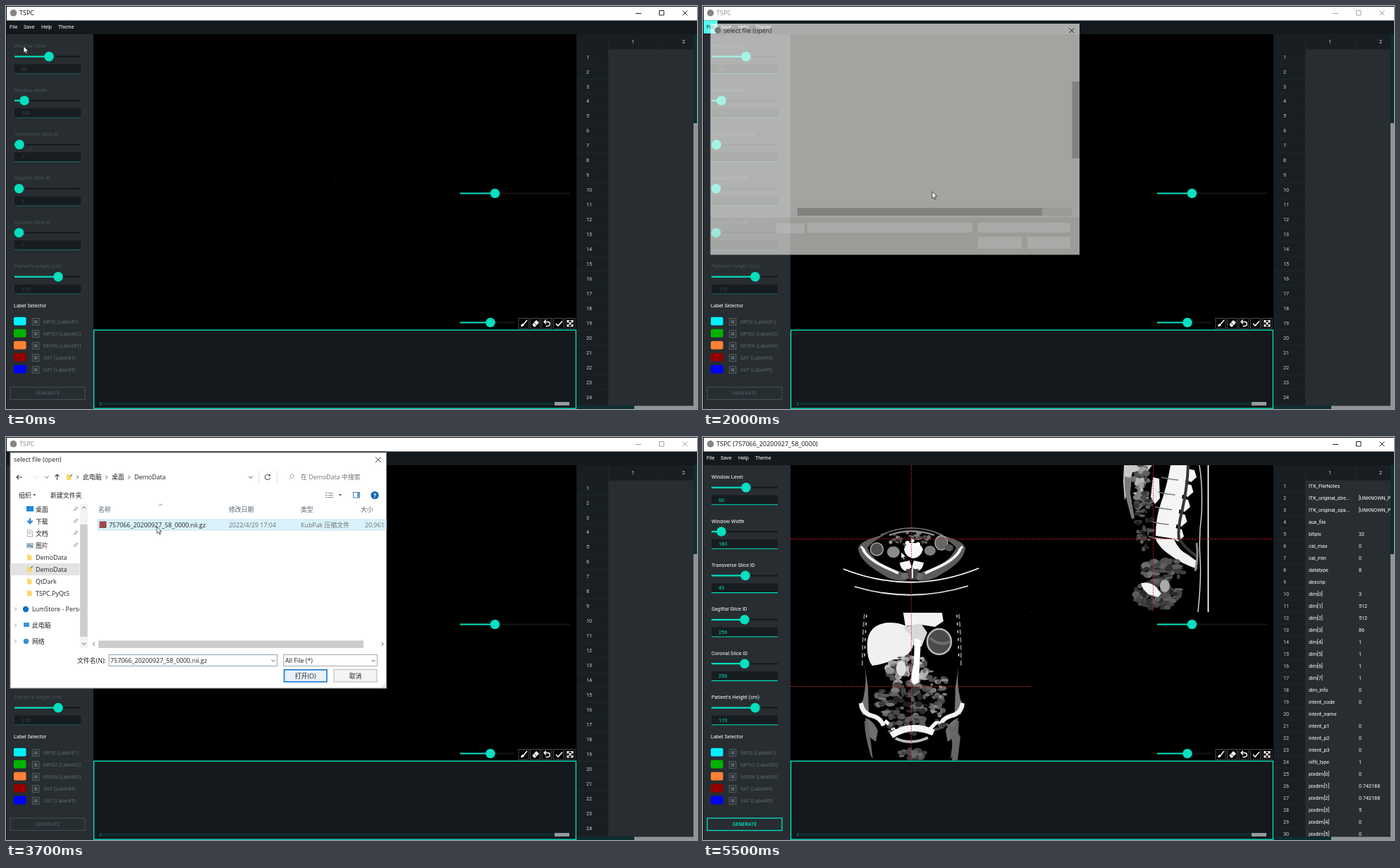
Animation, 980 px wide and 571 px high, one loop 5600 ms. Source, as an HTML page:

```html
<!DOCTYPE html>
<html lang="en">
<head>
<meta charset="utf-8">
<title>TSPC</title>
<style>
html, body { margin: 0; width: 100%; height: 100%; overflow: hidden; background: #000; }
svg { display: block; width: 980px; height: 571px; }
text { font: 7.3px Roboto, sans-serif; white-space: pre; }
.win, .win text { font: 9px "Open Sans", "Noto Sans", sans-serif; }
.dlg text { font: 8.9px "Open Sans", "Noto Sans", "Noto Sans CJK SC", "Noto Sans CJK", sans-serif; }
.table text { font-size: 7.2px; }
</style>
</head>
<body>
<svg id="stage" viewBox="0 0 980 571" xmlns="http://www.w3.org/2000/svg"></svg>
<script>
const LOOP = 5600;
const TEAL = '#05dfc0', DARK = '#13191c', PANEL = '#272d31';
let css = '', count = 0;

// ---- drawing helpers
const rect = (x, y, w, h, fill, more = '') => `<rect x="${x}" y="${y}" width="${w}" height="${h}" fill="${fill}" ${more}/>`;
const frame = (x, y, w, h, stroke, fill = 'none', sw = 1) => rect(x, y, w, h, fill, `stroke="${stroke}" stroke-width="${sw}"`);
const text = (x, y, s, fill = '#fff', more = '') => `<text x="${x}" y="${y}" fill="${fill}" ${more}>${s}</text>`;
const line = (d, stroke, sw = 1, more = '') => `<path d="${d}" fill="none" stroke="${stroke}" stroke-width="${sw}" ${more}/>`;
const shape = (d, fill) => `<path d="${d}" fill="${fill}"/>`;
const dot = (x, y, r, fill) => `<circle cx="${x}" cy="${y}" r="${r}" fill="${fill}"/>`;
const oval = (x, y, rx, ry, fill, more = '') => `<ellipse cx="${x}" cy="${y}" rx="${rx}" ry="${ry}" fill="${fill}" ${more}/>`;
const group = (cls, ...parts) => `<g class="${cls}">${parts.flat().join('')}</g>`;

// ---- timing helpers
const pct = t => (Math.max(0, t - 4) / LOOP * 100).toFixed(3) + '%';

// shown between each pair of times
function show(cls, ...spans) {
  const on = 'visibility:visible', off = 'visibility:hidden';
  let keys = `0%{${off}}`, last = off;
  spans.forEach(([from, to = LOOP]) => {
    keys += `${pct(from)}{${on}}`;
    last = on;
    if (to < LOOP) { keys += `${pct(to)}{${off}}`; last = off; }
  });
  css += `@keyframes k${++count}{${keys}100%{${last}}} .${cls}{animation:k${count} ${LOOP}ms step-end infinite}\n`;
}

// moves through [time, x, y] stops in steps of 100 ms
function travel(cls, stops) {
  const keys = stops.map(([t, x, y], i) => {
    const n = i + 1 < stops.length ? (stops[i + 1][0] - t) / 100 : 1;
    return `${pct(t)}{transform:translate(${x}px,${y}px);animation-timing-function:steps(${n})}`;
  }).join('');
  const [, x, y] = stops[stops.length - 1];
  css += `@keyframes k${++count}{${keys}100%{transform:translate(${x}px,${y}px)}} .${cls}{animation:k${count} ${LOOP}ms infinite}\n`;
}

// ---- main window
const controls = c => line('M893 10.5h8M926.5 6.5h6.5v6.5h-6.5zM959.5 6.5l7 7M966.5 6.5l-7 7', c);

function titleBar() {
  return group('win', rect(1, 1, 979, 19.5, '#fff'), dot(10.5, 9.8, 4.8, '#858585'),
    group('plain', text(19, 13.2, 'TSPC', '#111')),
    group('faded', text(19, 13.2, 'TSPC', '#8c8c8c')),
    group('named', text(19, 13.2, 'TSPC (757066_20200927_58_0000)', '#111')),
    group('active', controls('#222')), group('faded', controls('#a2a2a2')));
}

const slider = (x0, x1, y, knob, rest = '#12181b') =>
  line(`M${x0} ${y}H${x1}`, rest, 2) + line(`M${x0} ${y}H${knob}`, TEAL, 2.2) + dot(knob, y, 6.8, TEAL);

const fields = [
  ['Window Level', 60, 61], ['Window Width', 180, 26],
  ['Transverse Slice ID', 1, 19, 43, 60], ['Sagittal Slice ID', 1, 18.5, 256, 59],
  ['Coronal Slice ID', 1, 18.5, 256, 59], ["Patient's Height (cm)", 170, 74],
];

function fieldSet(loaded) {
  return fields.map(([name, v0, k0, v1 = v0, k1 = k0], i) => {
    const y = 56.5 + i * 62.4;
    return text(12, y + 2.6, name, loaded ? '#fff' : '#4b5358') +
      slider(12, 106, y + 15.1, loaded ? k1 : k0) +
      rect(12, y + 26, 94, 13.5, '#161c1f') +
      line(`M12 ${y + 39.3}h94`, loaded ? TEAL : '#1d5f5b', 1.1) +
      text(22, y + 35.1, loaded ? v1 : v0, loaded ? TEAL : '#3a4347');
  }).join('') +
    frame(6, 540, 106, 17.5, loaded ? TEAL : '#465055', 'none', loaded ? 1.3 : 1) +
    text(59, 551.4, 'GENERATE', loaded ? TEAL : '#4b555a', 'text-anchor="middle" style="font-weight:500;font-size:7px"');
}

function labels() {
  const rows = [['MPSI', '#00f2ff'], ['MPSO', '#00b200'], ['MVEN', '#ff8136'], ['SAT', '#950000'], ['VAT', '#0000fe']];
  return text(11, 427, 'Label Selector') + rows.map(([s, c], i) => {
    const y = 447.5 + i * 17;
    return rect(11, y - 6.7, 17.5, 11.6, c, 'rx="2"') + frame(37.3, y - 4.8, 9.6, 9.6, '#5a6367') +
      rect(39.6, y - 2.5, 5, 5, '#565f63') + text(53, y + 2.8, `${s} (Label#${i + 1})`, '#5f686c');
  }).join('');
}

function tools() {
  const icons = [
    line('M739 445l-5 6', '#fff', 1.6) + shape('M730 454q1-4 3-4l2 2q-1 2-5 2z', '#fff'),
    shape('M746.5 451l5.5-6 4 3.5-5.5 6h-2z', '#fff') + line('M748.5 448.7l4 3.7', '#000', .8),
    line('M763 447.5h5.5q3 .3 3 3t-3 3h-3M766 444.5l-3 3 3 3', '#fff', 1.3),
    line('M780 450l3 3 6-6.5', '#fff', 1.6),
    line('M796 449v-3.5h3.5M800.5 445.5h3.5v3.5M804 450.5v3.500h-3.5M799.500 454h-3.5v-3.5M796 445.500l8 8.500M804 445.500l-8 8.500', '#fff', 1.1),
  ];
  return icons.map((icon, i) => frame(727 + i * 16.5, 442.5, 14, 14.5, '#4d4d4d', '#000') + icon).join('');
}

function view() {
  return rect(124, 40, 685, 419, '#000') + rect(465.5, 248, 1.2, 1.2, '#333');
}

function viewTools() {
  return slider(644, 800, 265.5, 693.5, '#151515') + slider(644, 722, 448.5, 687, '#151515') + tools();
}

function log() {
  return frame(124.6, 459.2, 683.8, 111, TEAL, DARK, 1.4) +
    line('M134 563.5h665', '#0d2e2f', 3.5) + rect(133.5, 561, 1, 5, '#16857a') + rect(778, 561, 21, 5, '#959b9d');
}

// ---- header table
function tableData() {
  const seq = (name, from, values) => values.map((v, i) => [`${name}${from + i}`, v]);
  const close = rows => rows.map(([k, v]) => [k + ']', v]);
  return [['ITK_FileNotes', ''], ['ITK_original_dire...', '[UNKNOWN_PRINT'], ['ITK_original_spa...', '[UNKNOWN_PRINT'],
    ['aux_file', ''], ['bitpix', 32], ['cal_max', 0], ['cal_min', 0], ['datatype', 8], ['descrip', ''],
    ...close(seq('dim[', 0, [3, 512, 512, 86, 1, 1, 1, 1])), ['dim_info', 0], ['intent_code', 0], ['intent_name', ''],
    ...seq('intent_p', 1, [0, 0, 0]), ['nifti_type', 1], ...close(seq('pixdim[', 0, [0, '0.742188', '0.742188', 5, 0, 0]))];
}

function rowHeads(n, first, step) {
  let s = '';
  for (let i = 0; i < n; i++) {
    const y = first + i * step;
    s += text(823, y + 2.6, i + 1, '#cdd1d3') + line(`M810 ${y + step / 2}H854`, '#22292c', .8);
  }
  return s;
}

function table() {
  const cells = tableData().map(([k, v], i) =>
    text(859, 72.1 + i * 17, k) + text(930, 72.1 + i * 17, v)).join('');
  return group('table', rect(809, 40, 171, 531, '#181e21'), rect(854, 61.5, 121, 505, PANEL),
    line('M854.500 40v526M925.500 40v22', '#22292c', .8),
    text(889, 53.3, 1, '#dde0e1', 'text-anchor="middle"'), text(961, 53.3, 2, '#dde0e1', 'text-anchor="middle"'),
    group('empty', rowHeads(24, 72, 20.96)),
    group('loaded', rowHeads(30, 69.5, 17), `<g clip-path="url(#cells)">${cells}</g>`),
    rect(975, 40, 5, 126, '#0b2f30'), rect(975, 166, 5, 405, '#8f9597'),
    rect(809, 566.5, 82, 4.5, '#0b2f30'), rect(891, 566.5, 84, 4.5, '#8f9597'));
}

// ---- scan slices
let seed = 11;
const rnd = () => (seed = seed * 16807 % 2147483647) / 2147483647;

function tissue(cx, cy, rx, ry, n, size, lo, hi) {
  let s = '';
  for (let i = 0; i < n; i++) {
    const a = rnd() * 6.283, r = Math.sqrt(rnd()), g = Math.round(lo + (hi - lo) * rnd());
    s += oval((cx + rx * r * Math.cos(a)).toFixed(1), (cy + ry * r * Math.sin(a)).toFixed(1),
      (size * (.4 + rnd())).toFixed(1), (size * (.3 + .7 * rnd())).toFixed(1), `rgb(${g},${g},${g})`);
  }
  return s;
}

const mirror = (cx, s) => s + `<g transform="translate(${2 * cx} 0) scale(-1 1)">${s}</g>`;

function axial() {
  const side = shape('M220 158Q221 150 238 144L262 136Q240 148 233 157Q240 174 262 184L288 194V203Q270 206 252 193Q222 176 220 158Z', '#5c5c5c') +
    line('M227 159Q234 174 262 186L277 193', '#f4f4f4', 4) + line('M224 155l5 6', '#fff', 3) +
    shape('M279 178l14-3 3 10-9 5q-7-3-8-12z', '#f6f6f6') + oval(287, 197, 6, 5, '#6d6d6d');
  return mirror(296, side) +
    line('M252 139Q295 119 340 139', '#777', 1.6) + line('M264 139Q296 128 328 139', '#8d8d8d', 2.5) +
    oval(246.500, 159, 9, 9, '#4e4e4e', 'stroke="#a5a5a5" stroke-width="1.5"') +
    oval(270, 163, 9, 8, '#8b8b8b') + oval(322, 161, 8, 7, '#7d7d7d') +
    oval(338, 150, 9, 10, '#666', 'stroke="#a5a5a5" stroke-width="1.500"') + oval(349, 157, 6, 5, '#555') +
    tissue(296, 145, 34, 10, 34, 3, 60, 150) +
    shape('M285 159q3-10 12-9 11-1 15 9-3 12-14 13-11-2-13-13z', '#f8f8f8') +
    dot(290, 150, 3, '#fff') + dot(297, 147, 2.6, '#eee') + dot(305, 152, 3, '#fff') +
    shape('M288 187h18l-4 15h-10z', '#444') + line('M297 186v14', '#fff', 2) +
    line('M199 187Q295 225 391 186', '#fff', 1.8) + line('M215 212Q295 236 376 211', '#eee', 1.8);
}

function coronal() {
  const side = line('M229 251Q226 280 226 325', '#777', 2, 'stroke-dasharray="7 4"') +
    line('M232 252Q230 280 229 318', '#ddd', 1.4, 'stroke-dasharray="4 7"') +
    shape('M229 322q4 25-2 50l-6 10 6 12 8-4-1-36z', '#747474') +
    line('M224 377Q226 392 240 395Q252 398 256 409', '#f2f2f2', 6) +
    shape('M230 398q12 4 18 18l-3 16-10-8z', '#6f6f6f') +
    line('M258 402q12 10 16 18', '#fff', 5) + shape('M229 402q0 20 9 50l3 4q-4-30-6-50z', '#666');
  return mirror(296, side) +
    shape('M284 249h55l2 12-12 8-20-3-22 2z', '#f3f3f3') +
    shape('M233 292Q234 266 262 263Q290 262 301 280L297 299Q287 317 271 315Q257 322 240 324Q232 315 233 292Z', '#f0f0f0') +
    shape('M283 270l26-6 9 13-8 20-11-1-5-16z', '#d9d9d9') +
    oval(335, 290, 17, 18, '#4a4a4a', 'stroke="#b9b9b9" stroke-width="2.5"') +
    line('M322 285q14 12 28 5', '#6d6d6d', 4) +
    tissue(292, 330, 34, 20, 55, 5, 70, 190) + tissue(290, 375, 48, 28, 100, 5, 25, 125) +
    tissue(333, 365, 15, 30, 40, 4, 70, 155) +
    shape('M300 285l9 3-3 60-7 3-5-6 5-25z', '#fff') + oval(281, 328, 7, 11, '#ddd') +
    tissue(296, 408, 45, 12, 40, 4, 50, 110) +
    line('M267 423Q296 404 327 419', '#f5f5f5', 9) + line('M273 427q22 10 46-1', '#bbb', 4) +
    tissue(296, 450, 20, 7, 28, 5, 55, 110) +
    shape('M344 405q16 5 21 21l-4 32h-8q4-30-9-53z', '#666');
}

function sagittal() {
  let bones = '';
  for (let i = 0; i < 5; i++) {
    const x = 661 - i * 4.5, y = 57 + i * 21;
    bones += line(`M${x - 11} ${y}q11 3 24 4`, '#777', 1.7) +
      shape(`M${x + 22} ${y - 13}l14 3 3 10-8 7-12-6z`, '#f7f7f7');
  }
  return shape('M597 40h40l-6 8-22 2-5 22-6 18-2-26z', '#c9c9c9') +
    shape('M598 56q-1 20 4 38l6 22 4-1-6-35 2-22z', '#7a7a7a') +
    tissue(622, 65, 12, 25, 32, 5, 65, 195) + tissue(625, 118, 12, 42, 55, 4, 25, 110) +
    shape('M638 57l9 2 1 28-7 8-6-10z', '#eee') +
    shape('M663 40h25q-3 25-11 55-5 30-10 49l-25-4q0-25 7-45 9-25 14-55z', '#f5f5f5') + bones +
    shape('M641 143l27 2q7 16 20 22l11 8 2 12q-23-8-36-18-18-11-24-26z', '#f2f2f2') +
    line('M688 40q-1 30-8 62-7 27-5 42 10 15 25 25', '#373737', 4) +
    line('M704 40q5 30 3 70-4 30-2 62 2 28-3 76', '#ddd', 1.4) +
    line('M700 150q3 20-2 40', '#888', 3) +
    tissue(653, 190, 30, 18, 80, 5, 40, 115) + tissue(645, 224, 33, 20, 100, 5, 40, 100) +
    shape('M621 207q13-2 21 5l8 10-5 5-13-4q-9-7-11-16z', '#f4f4f4') + oval(655, 211, 7, 9, '#aaa') +
    line('M716.500 40v208', '#fff', 1.8);
}

function scans() {
  return axial() + `<g clip-path="url(#lower)">${coronal()}</g><g clip-path="url(#upper)">${sagittal()}</g>` +
    line('M124 144.500H808M124 353.500H466M295.500 40V458M638.500 40V248', '#e3242b', 1, 'stroke-dasharray="1.600 1.600"');
}

// ---- file menu
const menuWords = () => text(25, 32.1, 'Save') + text(50, 32.1, 'Help') + text(74, 32.1, 'Theme');

function dropDown() {
  return group('menu', frame(1, 39.500, 90.500, 50, '#9aa1a3', DARK),
    group('hover', rect(1.500, 40, 89.500, 24.500, '#62fff5')),
    group('calm', text(10, 54.600, 'Open `.nii.gz` file ...')),
    group('hover', text(10, 54.600, 'Open `.nii.gz` file ...', '#10211f')),
    text(10, 79.600, 'Open `.dicom` file ...'));
}

// ---- file dialog
const INK = '#222', SOFT = '#6f7275';
const folder = (x, y) => shape(`M${x} ${y - 4}h3l1 1h2.500v7h-6.500z`, '#fbd769');
const sheet = (x, y) => line(`M${x} ${y - 4.500}h5l2 2v7h-7z`, '#9a9a9a', .8);
const chevron = (x, y, dx, dy, c = '#555') =>
  line(dx ? `M${x - dx} ${y - 2.500}l${2 * dx} 2.500l${-2 * dx} 2.500` : `M${x - 2.500} ${y - dy}l2.500 ${2 * dy}l2.500 ${-2 * dy}`, c);
const down = (x, y) => shape(`M${x - 2} ${y - 1}h4l-2 2.500z`, '#444');

function sideBar() {
  const top = ['桌面', '下载', '文档', '图片', 'DemoData', 'DemoData', 'QtDark', 'TSPC.PyQt5'];
  const pins = [0, 1, 2, 3].map(i => line(`M96 ${105 + i * 17}l2-2m-1-2l3 3m-1.500-2l2.500-2.500m-2-1l3 3`, '#8b8b8b', 1)).join('');
  return group('home', rect(6, 258, 98.500, 17.500, '#e9e9e9')) + group('demo', rect(6, 179, 98.500, 17, '#e3e3e3')) +
    rect(29, 98, 10, 7.500, '#1d87e0') + line('M34 115v7m-3.500-3.500l3.500 4 3.500-4', '#2a86d8', 2) +
    sheet(30.500, 136.500) + line('M32 135h4m-4 2h4', '#8aa0b5', .8) +
    rect(29, 150, 10, 7.500, '#a8c5d8') + line('M30 155l3-2 5 3', '#3d5c70') +
    [170.500, 187.500, 204.500, 221.500].map(y => folder(30, y)).join('') + line('M35 186l3-3', '#3c8f6c', 1.300) +
    top.map((s, i) => text(42, 105.500 + i * 17, s, INK)).join('') + pins +
    dot(28, 244, 4.200, '#1570c8') + `<g clip-path="url(#side)">${text(37, 247.200, 'LumStore - Personal', INK)}</g>` +
    text(37, 270.200, '此电脑', INK) + text(37, 292.700, '网络', INK) +
    group('demo', [244, 267, 289.500].map(y => chevron(13.500, y, 1.200, 0, '#999')).join(''),
      rect(25, 263, 8, 6, '#3a96d8'), dot(28.500, 289.500, 3.800, '#3b8fc9')) +
    rect(105, 95, 11, 204, '#f3f3f3') + rect(105, 124, 10.500, 159, '#cdcdcd') +
    chevron(110.500, 100, 0, -1.300) + chevron(110.500, 293, 0, 1.300);
}

function chrome() {
  return frame(6, 22, 533.500, 334, '#8a8a8a', '#fff') +
    group('early', dot(16.500, 32, 4.600, '#858585'), text(25, 35.300, 'select file (open)', INK)) +
    group('late', text(11, 35.300, 'select file (open)', INK)) +
    line('M524 28.500l7.500 7.500M531.500 28.500l-7.500 7.500', '#333') +
    line('M72.500 61v-8m-3 3l3-3 3 3', '#444', 1.100) + folder(86, 57) + chevron(347, 57, 0, 1.500) +
    line('M358.500 47v20M384.500 47v20', '#e3e3e3') +
    line('M374 54.500a3.700 3.700 0 1 0 .7 3M374.500 52.500v2.500h-2.500', '#555', 1.100) +
    line('M402 60l2-2.500a2.600 2.600 0 1 1 1 .6', '#9a9a9a') +
    text(18, 85.500, '组织', INK) + down(40.500, 82) + text(63, 85.500, '新建文件夹', INK) +
    line('M453 79.500h3m1 0h7m-11 3h3m1 0h7m-11 3h3m1 0h7', '#8a8a8a') + down(474, 82) +
    frame(492.500, 78.500, 9, 7.500, '#4a7fae', '#fff') + rect(498, 79, 3.500, 6.500, '#58a6e2') +
    dot(523, 82.500, 5.600, '#1266b5') + text(523, 85.700, '?', '#fff', 'text-anchor="middle" style="font-weight:700"') +
    chevron(219, 96, 0, -1.200, '#888') +
    [[131, '名称'], [316, '修改日期'], [418, '类型'], [503, '大小']].map(([x, s]) => text(x, 106, s, '#5a6673')).join('') +
    text(101, 319.700, '文件名(N):', INK) +
    frame(393.500, 308.500, 133, 16, '#a9a9a9', '#fff') + text(396, 319.700, 'All File (*)', INK) + chevron(521, 317, 0, 1.300) +
    frame(394.500, 329.800, 60.500, 17, '#1479d2', '#e9f1f8', 1.600) + frame(465, 329.500, 61, 17.500, '#b5b5b5', '#f4f4f4') +
    text(424.700, 341.500, '打开(O)', INK, 'text-anchor="middle"') + text(495.500, 341.500, '取消', INK, 'text-anchor="middle"') +
    line('M533 355l5-5m-2.500 5l2.500-2.500', '#bbb');
}

const hBar = (w, arrow) => chevron(124.500, 293.500, -1.300, 0) + rect(131, 288.500, w, 10.500, '#cdcdcd') + chevron(arrow, 293.500, 1.300, 0);

function projectPage() {
  const rows = [['.git', '7/24 0:10'], ['.virtual_documents', '7/24 0:21'], ['__pycache__', '7/24 22:29'], ['build', '7/24 18:53'],
    ['Caches', '7/24 22:41'], ['DATASET', '7/23 12:39'], ['dist', '7/24 19:11'], ['Icons', '7/24 20:36'],
    ['757066_20200927_58_0000.nii.gz', '7/24 22:40', 'KubPak 压缩文件'], ['main.py', '7/24 22:38', 'PY 文件'], ['main.spec', '7/24 18:53', 'SPEC 文件']];
  return line('M22 57h-7m3-3l-3 3 3 3M39 57h7m-3-3l3 3-3 3', '#ececec') +
    text(98, 59.800, '«', INK) + text(109, 59.800, 'paper', INK) + chevron(140.500, 57, 1.200, 0) +
    text(148, 59.800, 'W-Journal 2022-CART', INK) + chevron(246.500, 57, 1.200, 0) + text(254, 59.800, 'TSPC.PyQt5', INK) +
    text(418, 59.800, '在 TSPC.PyQt5 中搜索', SOFT) + rect(130, 254.500, 398, 15, '#f5f9fb') +
    rows.map(([name, date, type], i) => {
      const y = 124.700 + i * 15.270;
      return (type ? sheet : folder)(134, y) + text(146, y + 3.200, name, INK) +
        text(316, y + 3.200, '2022/' + date, SOFT) + text(418, y + 3.200, type || '文件夹', SOFT);
    }).join('') + line('M134 287.500h5l2 1', '#9a9a9a', .8) +
    rect(528.500, 95, 10.500, 192, '#f3f3f3') + rect(528.500, 106, 10.500, 111, '#cdcdcd') +
    chevron(534, 100, 0, -1.300) + chevron(534, 282, 0, 1.300) + hBar(354.500, 521.500) +
    frame(146, 308.500, 238.500, 16, '#2f86d6', '#fff') + line('M148.500 311.500v10', '#111', .9) + chevron(379, 317, 0, 1.300);
}

function demoPage() {
  const file = '757066_20200927_58_0000.nii.gz';
  return line('M23 57h-8m3-3l-3 3 3 3', '#444', 1.100) + line('M39 57h7m-3-3l3 3-3 3', '#e8e8e8') + chevron(58, 57, 0, 1.200) +
    line('M91 56l3-3', '#3c8f6c', 1.300) + chevron(101.500, 57, 1.200, 0) + text(109, 59.800, '此电脑', INK) + chevron(142.500, 57, 1.200, 0) +
    text(150, 59.800, '桌面', INK) + chevron(174.500, 57, 1.200, 0) + text(182, 59.800, 'DemoData', INK) +
    text(418, 59.800, '在 DemoData 中搜索', SOFT) +
    group('picked', frame(130.500, 117, 408.500, 15, '#c0e4f3', '#dbf2fb')) +
    rect(132.500, 119.500, 10, 9.500, '#9b4a50') + text(146, 127.900, file, INK) +
    text(316, 127.900, '2022/4/29 17:04', SOFT) + text(418, 127.900, 'KubPak 压缩文件', SOFT) + text(509, 127.900, '20,961', SOFT) +
    hBar(376, 534) + frame(146, 308.500, 238.500, 16, '#8fa3b5', '#fff') +
    group('picked', text(148, 319.700, file, INK)) + chevron(379, 317, 0, 1.300);
}

// half-open dialog
function opening() {
  const part = (x, y, w, h, c) => rect(x, y, w, h, c, 'opacity=".35"');
  return group('opening win', rect(10.500, 25, 523.500, 327.500, '#fffffb', 'opacity=".64"'),
    dot(21, 34.500, 4.500, '#777'), text(29, 38, 'select file (open)', '#222'),
    line('M519.500 31.500l6.500 6.500M526 31.500l-6.500 6.500', '#222'),
    rect(10.500, 300, 523.500, 52.500, '#000', 'opacity=".05"'),
    part(523.500, 107, 10.500, 109, '#444'), part(134, 286, 347, 11, '#444'), part(481, 286, 42, 11, '#888'),
    [[104, 308, 40], [148, 307, 234], [390, 307, 131], [390, 327, 62], [460, 327, 61]].map(([x, y, w]) => part(x, y, w, y > 320 ? 17 : 14, '#c4c4c4')));
}

const pointer = () => '<path d="M0 0v9.500l2.200-2 1.500 3.400 1.600-.7-1.500-3.300h3z" fill="#fff" stroke="#111" stroke-width=".7"/>';

// ---- assembly
document.getElementById('stage').innerHTML = `<defs>
  <clipPath id="cells"><rect x="854" y="40" width="121" height="526.500"/></clipPath>
  <clipPath id="side"><rect x="6" y="230" width="98" height="30"/></clipPath>
  <clipPath id="lower"><rect x="124" y="249" width="342" height="209"/></clipPath>
  <clipPath id="upper"><rect x="590" y="40" width="140" height="208.500"/></clipPath></defs>` + [
  rect(0, 0, 980, 571, '#0c1012'), rect(1, 20.500, 979, 19.500, DARK), rect(1, 40, 123, 531, PANEL),
  titleBar(), menuWords(),
  text(5, 32.100, 'File'), group('tab', rect(1, 20.500, 19.500, 18.500, '#4ff9ed'), text(5, 32.100, 'File', '#10211f')),
  group('empty', fieldSet(false)), group('loaded', fieldSet(true)), labels(),
  view(), group('loaded', scans()), viewTools(), log(), table(), dropDown(), opening(),
  group('dialog dlg', rect(1, 20.500, 538, 19.500, DARK), chrome(), sideBar(),
    group('project', projectPage()), group('demo', demoPage())),
  group('cursor', pointer()),
].join('');

show('tab', [300, 2100]);
show('menu', [400, 1100]);
show('hover', [700, 1100]);
show('calm', [400, 700]);
show('plain', [0, 1400], [3900, 4000]);
show('faded', [1400, 3900]);
show('active', [0, 1400], [3900]);
show('named', [4000]);
show('opening', [2000, 2100]);
show('dialog', [2100, 3900]);
show('early', [2100, 2600]);
show('late', [2600, 3900]);
show('home', [2100, 2700]);
show('project', [2100, 2800]);
show('demo', [2800, 3900]);
show('picked', [3300, 3900]);
show('empty', [0, 4800]);
show('loaded', [4800]);
travel('cursor', [[0, 25, 57], [300, 11, 30], [500, 13, 33], [800, 30, 54], [1200, 30, 54], [1900, 325, 263], [2100, 325, 263],
  [2400, 95, 176], [2700, 62, 185], [2900, 62, 185], [3300, 214, 127], [3800, 214, 127], [4200, 225, 233], [4600, 225, 233], [5000, 281, 163]]);

const sheetEl = document.createElement('style');
sheetEl.textContent = css;
document.head.append(sheetEl);
</script>
</body>
</html>
```
